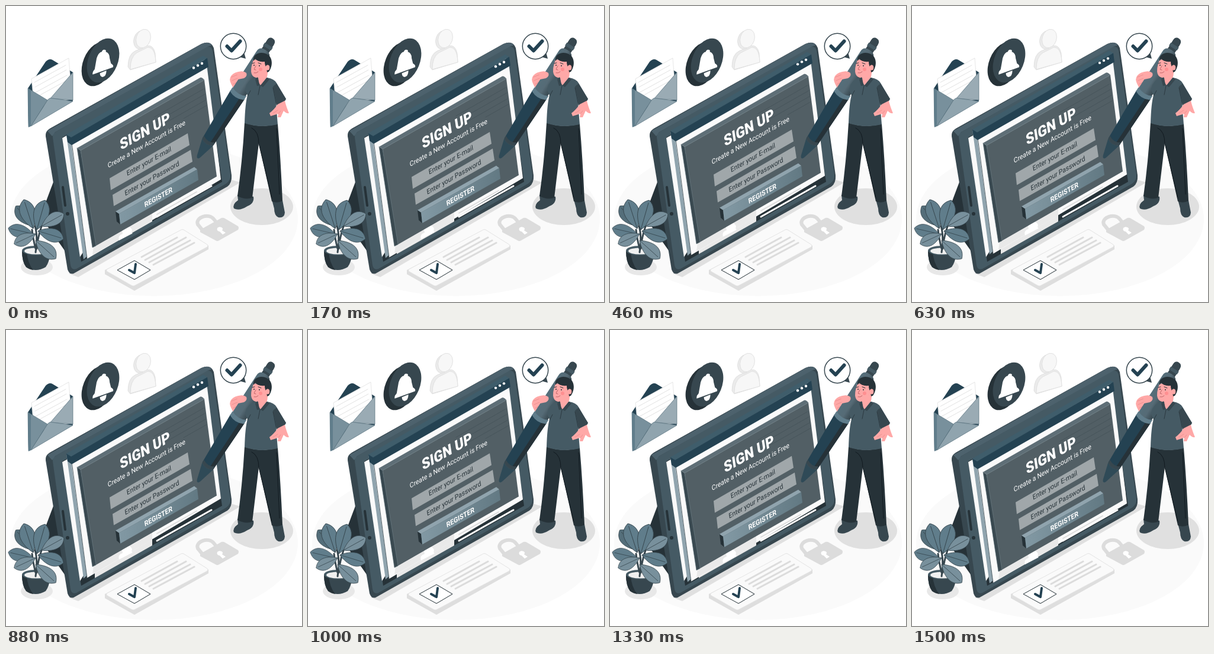
Recreate the animation shown at these times as an HTML page. Size 500 by 500 pixels, loop 1540 ms.

```html
<!DOCTYPE html>
<html lang="en">
<head>
<meta charset="utf-8">
<title>Sign up</title>
<style>
html, body { margin: 0; width: 100%; height: 100%; overflow: hidden; background: #fff; }
svg { display: block; width: 100%; height: 100%; }
text { font-family: Roboto, Inter, sans-serif; font-size: 11.5px; text-anchor: middle; }
.ink { fill: #263238; }
.dark { fill: #37474f; }
.slate { fill: #455a64; }
.navy { fill: #244252; }
.steel { fill: #607d8b; }
.mist { fill: #90a4ae; }
.white { fill: #fff; }
.pale { fill: #f7f7f7; }
.grey { fill: #e0e0e0; }
.skin { fill: #ffa8a7; }
.line { fill: none; stroke-linecap: round; stroke-linejoin: round; }
</style>
</head>
<body>
<svg viewBox="0 0 500 500">
  <defs>
    <linearGradient id="button"><stop stop-color="#8299a4"/><stop offset="1" stop-color="#627983"/></linearGradient>
    <linearGradient id="barrel"><stop stop-color="#546e7a"/><stop offset=".5" stop-color="#566b76"/><stop offset="1" stop-color="#37474f"/></linearGradient>
    <g id="leaf" stroke="#37474f" stroke-width=".8">
      <path d="M0 0C-8-10-22-34 0-46C20-34 8-10 0 0Z"/>
      <path d="M0 0V-42"/>
    </g>
  </defs>

  <!-- floor -->
  <ellipse cx="250" cy="360" rx="243" ry="130" fill="#fafafa"/>
  <path class="grey" d="M106 452L372 291L396 298L122 458Z"/>
  <ellipse class="grey" cx="432" cy="339" rx="53" ry="31"/>
  <ellipse cx="52" cy="441" rx="27" ry="14" fill="#e8e8e8"/>

  <!-- lock -->
  <path class="line" d="M333 380L324 369C319 357 343 349 351 360L359 370" stroke="#dcdcdc" stroke-width="6"/>
  <path d="M328 378L364 358Q367 357 370 359L392 372Q394 374 392 378L360 396Q357 398 354 396L328 382Z" fill="#dcdcdc"/>
  <path class="white" d="M357 375C361 371 369 375 365 379L371 383L366 386L361 381Q355 380 357 375Z"/>

  <!-- checked card -->
  <path d="M167 446L298 379L342 405V411L217 481L167 453Z" fill="#dedede"/>
  <path d="M170 445L296 378Q298 377 300 378L340 403Q342 405 340 407L218 472Q215 474 212 472L170 448Z" fill="#fafafa" stroke="#e4e4e4"/>
  <path d="M188 446L217 430L244 446L217 462Z" fill="#fff" stroke="#263238"/>
  <path class="line" d="M208 446L217 451L219 436" stroke="#244252" stroke-width="4"/>
  <path class="line" d="M229 424L289 391M235 429L304 391M242 433L311 396M249 437L318 400" stroke="#dcdcdc" stroke-width="3"/>

  <!-- tablet -->
  <path class="ink" d="M82 292L62 345L70 372L104 420Z"/>
  <path class="dark" d="M67 220Q66 212 74 207L330 64Q346 57 351 71L381 286Q382 299 374 305L114 452Q107 454 104 445Z"/>
  <path class="slate" d="M79 222Q78 216 85 212L337 70Q347 66 349 76L379 285Q380 294 372 300L119 444Q111 447 109 438Z"/>
  <path d="M70 211L331 64Q342 59 348 66L340 69L83 213L78 220Z" fill="#4d626d"/>
  <path class="ink" d="M95 222L335 85L365 297L127 432Z"/>
  <path d="M95 223L335 86L361 278L137 405L125 424Z" fill="#fafafa"/>
  <path d="M150 400L247 345V364L150 419Z" fill="#e9e9e9"/>
  <path class="line" d="M255 356L347 304" stroke="#fff" stroke-width="3"/>
  <path class="line" d="M96 306L100 337" stroke="#263238" stroke-width="4"/>
  <circle class="ink" cx="104" cy="351" r="3"/>

  <g id="floating">
    <!-- browser window -->
    <path class="mist" d="M102 217L110 222L139 421L131 428Z"/>
    <path d="M109 222L338 90L363 293L137 427Z" fill="#fafafa"/>
    <path class="line" d="M102 218L110 223L137 427L130 428" stroke="#37474f" stroke-width=".8"/>
    <path d="M148 405L247 349V362L146 421Z" fill="#e9e9e9"/>
    <path class="white" d="M191 396Q188 388 197 385Q194 377 202 374Q211 371 213 379Q211 383 214 384Z"/>
    <path class="line" d="M255 352L322 314" stroke="#dcdcdc" stroke-width="1.8"/>
    <path d="M102 217L333 84L340 88L110 223Z" fill="#3f5d6b"/>
    <path class="navy" d="M102 217L110 222L340 88L342 103L111 235L104 230Z"/>
    <circle class="white" cx="317" cy="104.5" r="2.2"/>
    <circle class="white" cx="324" cy="100.5" r="2.2"/>
    <circle class="white" cx="331" cy="97" r="2.2"/>

    <!-- sign-up panel -->
    <path class="dark" d="M120 240L126 244L152 405L146 408Z"/>
    <path d="M120 240L328 121Q331 120 335 125L126 244Z" fill="#5e6e76"/>
    <path d="M126 244L335 125L356 288L152 405L146 408Z" fill="#3c4a51" fill-opacity=".88"/>
    <path class="line" d="M250 188L334 140M248 199L336 149M263 201L337 159M300 190L339 168" stroke="#455258" stroke-width=".8"/>
    <path class="line" d="M120 240L146 408L152 405L126 244L335 125" stroke="#6c7d85" stroke-width=".7"/>

    <text class="white" transform="matrix(.87 -.49 .15 1 236 220)" font-weight="900" style="font-size:25px">SIGN UP</text>
    <text class="white" transform="matrix(.87 -.49 .15 1 238 237)">Create a New Account is Free</text>
    <path d="M175 291L307 215L310 235L177 311Z" fill="#a0a7aa"/>
    <path d="M180 319L312 243L315 263L182 338Z" fill="#a0a7aa"/>
    <text class="ink" transform="matrix(.87 -.49 .15 1 242 266)">Enter your E-mail</text>
    <text class="ink" transform="matrix(.87 -.49 .15 1 247 295)">Enter your Password</text>
    <path class="ink" d="M185 347L191 351L193 369L187 364Z"/>
    <path class="mist" d="M185 347L318 272L323 276L191 351Z"/>
    <path d="M191 351L323 276L325 294L193 369Z" fill="url(#button)"/>
    <text class="white" transform="matrix(.87 -.49 .15 1 258 327)" font-weight="700" style="font-size:11.8px">REGISTER</text>
  </g>

  <!-- raised hand and pen -->
  <path class="skin" d="M412 142L401 127L406 117Q407 111 399 111Q387 110 381 117Q376 123 380 131L386 143Q390 148 398 144Z"/>
  <path class="line" d="M381 120L391 116M382 126L391 122M384 132L392 128" stroke="#e58b8b" stroke-width=".8"/>
  <g transform="translate(323 258) rotate(32.2)">
    <path class="dark" d="M-7-214V-232Q-7-240 0-240Q7-240 7-232V-214Z"/>
    <path class="slate" d="M-8-227H8V-221H-8Z"/>
    <path d="M-13-128L-12-207Q-12-217 0-217Q12-217 12-207L13-128Z" fill="url(#barrel)"/>
    <path class="navy" d="M-11-34L-14-128Q0-121 14-128L11-34Q0-27-11-34Z"/>
    <path class="ink" d="M4-31L6-125L14-128L11-34Z"/>
    <path class="steel" d="M-14-134Q0-127 14-134V-126Q0-119-14-126Z"/>
    <path d="M-11-33Q0-26 11-33L3-4Q0 2-3-4Z" fill="#2f4a57"/>
    <path class="dark" d="M-11-39Q0-32 11-39V-33Q0-26-11-33Z"/>
  </g>
  <path class="skin" d="M390 112Q400 108 406 113Q408 119 402 122L392 124Z"/>

  <!-- man -->
  <path class="dark" d="M391 319L418 322Q420 333 408 338Q394 347 385 342Q382 335 392 328Z"/>
  <path class="dark" d="M449 327L467 328L471 349Q470 359 460 357Q453 354 453 342Z"/>
  <path class="ink" d="M403 197Q430 207 459 199Q464 258 467 329Q458 334 449 330L427 232L416 324Q404 328 391 321Q399 265 403 197Z"/>
  <path class="line" d="M415 206Q427 212 427 232L449 324M457 207L462 318" stroke="#111a20" stroke-width="1"/>
  <path class="slate" d="M414 124L425 120L441 121Q453 123 457 130L473 157Q469 166 458 168L456 164L459 200Q430 207 403 198Q404 164 408 151L404 142Q405 130 414 124Z"/>
  <path class="dark" d="M451 136L457 131L473 157Q469 166 458 168Z"/>
  <path class="line" d="M451 138L457 168M429 135L426 150M413 143L408 152" stroke="#263238" stroke-width=".8"/>
  <path class="skin" d="M459 166L471 160Q473 169 478 181Q473 182 469 177L464 188L459 188L460 182L447 186L445 181Q453 175 459 166Z"/>
  <path class="line" d="M451 181L459 176M460 182L464 177" stroke="#e58b8b" stroke-width=".8"/>
  <path class="skin" d="M418 91Q412 107 415 115Q418 122 426 121L427 130L430 134L441 120L444 99L438 88Z"/>
  <path class="dark" d="M425 120L429 135L441 121L445 124L434 137L429 134L424 135L421 124Z"/>
  <path class="ink" d="M418 93C416 80 431 76 440 81C450 85 452 100 444 111L441 112L440 104Q437 100 437 94Q425 95 421 89Z"/>
  <ellipse class="skin" cx="442" cy="104" rx="3.3" ry="4.5"/>
  <circle class="ink" cx="419" cy="100" r="1"/>
  <circle class="ink" cx="428" cy="101" r="1"/>
  <path class="line" d="M416 97L420 96M426 96L431 98" stroke="#263238"/>
  <path class="line" d="M422 101L419 107L422 108M419 113Q423 114 426 111" stroke="#b85f62" stroke-width=".9"/>
  <circle cx="430" cy="107" r="3" fill="#ff8f91"/>

  <!-- tick bubble -->
  <path class="dark" d="M394 86L405 89L402 78Z"/>
  <circle cx="384" cy="68" r="21.7" fill="#fff" stroke="#37474f" stroke-width="1.5"/>
  <path class="line" d="M373.5 68L381 75.5L395.5 59.5" stroke="#244252" stroke-width="6"/>

  <!-- person icon -->
  <g stroke="#dedede" stroke-width=".8">
    <path fill="#ebebeb" d="M206 103Q206 82 218 76L239 67Q249 66 252 80L253 95L210 108Z"/>
    <path class="pale" d="M210 107Q210 86 221 79L239 70Q252 69 253 95Z"/>
    <ellipse fill="#ebebeb" cx="228" cy="57" rx="12" ry="16" transform="rotate(18 228 57)"/>
    <ellipse class="pale" cx="232" cy="55" rx="12" ry="16" transform="rotate(18 232 55)"/>
  </g>

  <!-- bell -->
  <ellipse class="ink" cx="155" cy="98" rx="25" ry="39" transform="rotate(22 155 98)"/>
  <ellipse class="dark" cx="164" cy="92" rx="25" ry="39" transform="rotate(22 164 92)"/>
  <g class="white" transform="translate(163 97) scale(1.1) translate(-163 -99)">
    <path d="M148 116Q147 112 151 108L154 91Q157 82 162 81Q163 77 167 78Q169 79 168 81Q174 83 174 91L176 99Q181 102 179 105Z"/>
    <path d="M159 114L169 110Q169 119 163 120Q159 119 159 114Z"/>
  </g>

  <!-- envelope -->
  <path class="navy" d="M37 139L67 94Q74 87 80 92L113 112V160L38 204Z"/>
  <path d="M43 123L106 88L109 126L111 157L48 172Z" fill="#fff" stroke="#dcdcdc" stroke-width=".7"/>
  <path class="line" d="M48 129L101 100M49 137L102 108M50 146L103 117M51 154L104 125" stroke="#dedede" stroke-width=".9"/>
  <g stroke="#546e7a" stroke-width=".7">
    <path fill="#78909c" d="M37 139L70 159L43 202L38 204Z"/>
    <path fill="#9aabb4" d="M113 112L75 156L113 159Z"/>
    <path class="mist" d="M42 203L71 158Q74 154 79 156L113 161Z"/>
  </g>
  <path class="steel" d="M37 139L42 143V203L38 205Z"/>

  <!-- plant -->
  <path class="dark" d="M27 413Q27 432 34 441Q50 451 67 441Q74 432 75 413Z"/>
  <path class="ink" d="M27 413Q27 432 34 441Q39 445 46 446Q36 434 35 414Z"/>
  <ellipse class="slate" cx="51" cy="413" rx="24" ry="8"/>
  <ellipse cx="51" cy="414" rx="20" ry="5.5" fill="#f0f0f0"/>
  <path class="line" d="M50 416Q54 388 49 372M50 410Q45 390 44 378M52 410Q53 393 60 372" stroke="#37474f" stroke-width="3"/>
  <g id="leaves"></g>
</svg>
<script>
const leaves = document.getElementById("leaves");
const floating = document.getElementById("floating");

// base x, base y, angle, scale, colour
const leafSpecs = [
  [46, 372, -41, .98, "#546e7a"],
  [46, 376, -18, 1.12, "#607d8b"],
  [52, 378, 16, 1.13, "#607d8b"],
  [60, 372, 61, .94, "#78909c"],
  [46, 385, -77, .94, "#607d8b"],
  [50, 385, -115, .87, "#78909c"],
  [54, 380, 107, .98, "#607d8b"],
  [50, 396, 132, 1, "#78909c"]
];
leaves.innerHTML = leafSpecs.map(([x, y, angle, scale, colour]) =>
  `<use href="#leaf" fill="${colour}" transform="translate(${x} ${y}) rotate(${angle}) scale(${scale})"/>`
).join("");

const LOOP = 1540;
const HALF = 750; // linear rise, then linear fall, then a short rest
const RISE = 10;

function draw(now) {
  const time = now % LOOP;
  const lift = RISE * Math.max(0, 1 - Math.abs(1 - time / HALF));
  floating.setAttribute("transform", `translate(0 ${-lift})`);
  requestAnimationFrame(draw);
}
draw(performance.now());
</script>
</body>
</html>
```
